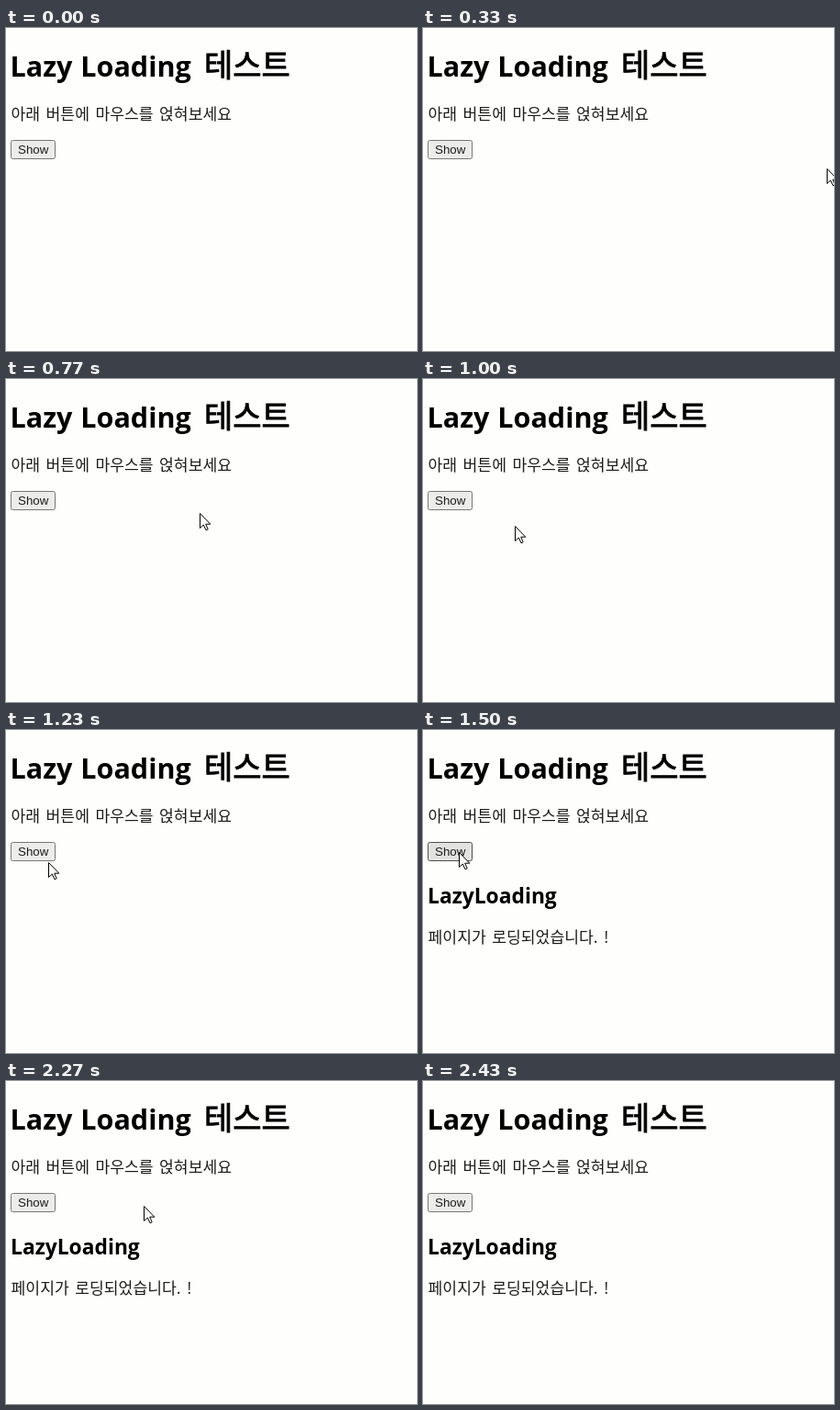
Animation of 448x352 px, one loop 3.23 s. Source, as an HTML page:

```html
<!DOCTYPE html>
<html lang="ko">
<head>
<meta charset="utf-8">
<style>
html, body { margin: 0; width: 100%; height: 100%; overflow: hidden; background: #fefefc; }
svg { display: block; }
.latin { font-family: "Open Sans", sans-serif; font-weight: bold; word-spacing: 1px; }
.hangul { font-family: "Noto Sans CJK KR", "Noto Sans CJK", sans-serif; }
.title { font-size: 34px; stroke: #000; stroke-width: 0.9px; }
.body { font-size: 17.2px; word-spacing: 1.6px; fill: #1c1c1c; }
.label { font: 13.33px "Liberation Sans", Arial, sans-serif; fill: #1c1c1c; }
#button { fill: #ececea; stroke: #767676; }
#button.hover { fill: #e2e2e0; stroke: #4f4f4f; }
</style>
</head>
<body>
<svg width="448" height="352" viewBox="0 0 448 352">
  <text class="latin" x="4.5" y="53" font-size="30.5">Lazy Loading</text>
  <text class="hangul title" x="216" y="53">테스트</text>
  <text class="hangul body" x="5.5" y="100">아래 버튼에 마우스를 얹혀보세요</text>
  <rect id="button" x="5.5" y="122.5" width="48" height="20" rx="2"/>
  <text class="label" x="13" y="137">Show</text>
  <g id="content">
    <text class="latin" x="5" y="189" font-size="22.8">LazyLoading</text>
    <text class="hangul body" x="5.5" y="232">페이지가 로딩되었습니다. !</text>
  </g>
  <path id="cursor" d="M.5 .5V16.5L4.3 13 7 18.8 9.2 17.8 6.7 12.2H11.8Z" fill="#fefefc" stroke="#000"/>
</svg>
<script>
// Times are in ticks, 30 per second
const LOOP = 3230, ENTER = 10, LOADED = 43, DEPART = 63, GONE = 73;
// Key points of the approach: [tick, x, y]
const approach = [
  [ENTER, 440, 153], [16, 378, 152], [23, 211, 146], [30, 100, 160],
  [37, 46, 144], [42, 40, 131], [45, 39, 133]
];
const last = approach.length - 1;
const [button, content, cursor] =
  ["button", "content", "cursor"].map(id => document.getElementById(id));

function slope(i, axis) {
  const a = approach[Math.max(i - 1, 0)], b = approach[Math.min(i + 1, last)];
  return (b[axis] - a[axis]) / (b[0] - a[0]);
}

// Smooth curve through the key points, resting on the last one
function arrive(tick, axis) {
  if (tick >= approach[last][0]) return approach[last][axis];
  const i = approach.findIndex(key => key[0] > tick) - 1;
  const a = approach[i], b = approach[i + 1];
  const span = b[0] - a[0], k = (tick - a[0]) / span, r = 1 - k;
  return a[axis] * (1 + 2 * k) * r * r + b[axis] * (3 - 2 * k) * k * k
    + span * k * r * (slope(i, axis) * r - slope(i + 1, axis) * k);
}

function pointerAt(tick) {
  if (tick < DEPART) return [arrive(tick, 1), arrive(tick, 2)];
  const k = (tick - DEPART) / (GONE - 1 - DEPART);
  return [44 + 345 * k * k, 133 + 6 * k];
}

function draw(now) {
  const tick = Math.floor(0.3 * Math.floor(now % LOOP / 10) + 0.15);
  const inside = tick >= ENTER && tick < GONE;
  let hover = false;
  if (inside) {
    const [x, y] = pointerAt(tick).map(Math.round);
    hover = x < 54 && y < 143;
    cursor.setAttribute("transform", `translate(${x} ${y})`);
  }
  cursor.style.display = inside ? "" : "none";
  content.style.display = tick >= LOADED ? "" : "none";
  button.classList.toggle("hover", hover);
  requestAnimationFrame(() => draw(performance.now()));
}
draw(0);
</script>
</body>
</html>
```
